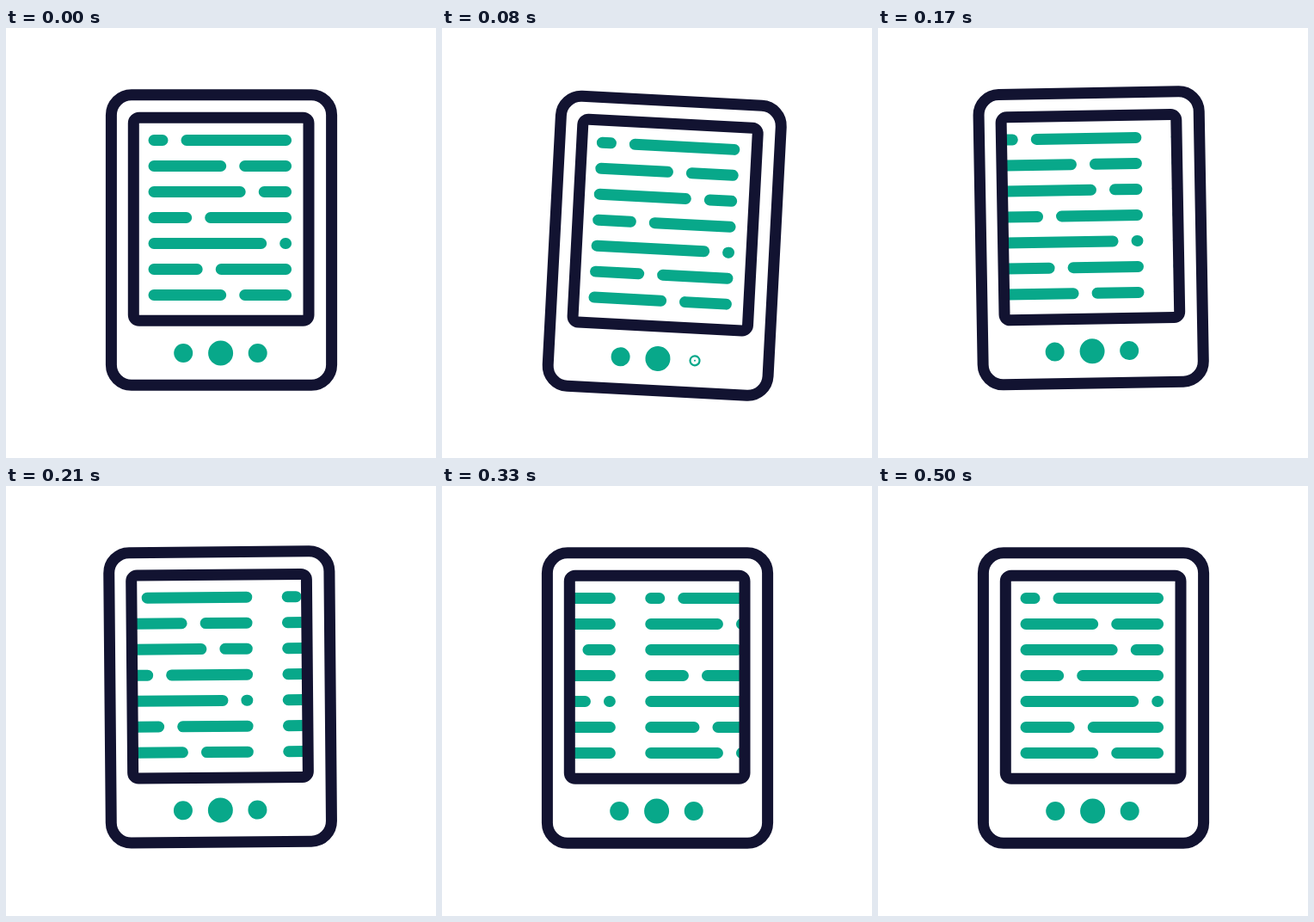
These frames come from a looping animation (500x500 px, 0.54 s). An HTML page:

```html
<!DOCTYPE html>
<html lang="en">
<head>
<meta charset="utf-8">
<title>E-reader page turn</title>
<style>
  html, body { margin: 0; height: 100%; overflow: hidden; background: #fff; }
  svg { display: block; width: 100vw; height: 100vh; }
</style>
</head>
<body>
<svg viewBox="0 0 500 500">
  <clipPath id="screen"><rect x="154" y="110" width="192" height="225"/></clipPath>
  <g id="device" fill="none" stroke-width="13">
    <g clip-path="url(#screen)">
      <path id="text" stroke="#08a88a" stroke-linecap="round"/>
    </g>
    <g stroke="#121331">
      <rect x="122.4" y="77.8" width="256.2" height="337.4" rx="23.5"/>
      <rect x="148.3" y="104.3" width="203.7" height="236" rx="6.5"/>
    </g>
    <g fill="#08a88a">
      <circle cx="206.2" cy="378" r="11"/>
      <circle cx="249.6" cy="378" r="14.5"/>
      <circle cx="292.7" cy="378" r="1"/>
    </g>
    <circle id="button" cx="292.7" cy="378" r="5.5" stroke="#08a88a"/>
  </g>
</svg>
<script>
const LOOP = 540, FPS = 24, PAGE = 201;
const device = document.getElementById("device");
const text = document.getElementById("text");
const button = document.getElementById("button");

const LEFT = 172, RIGHT = 325.6, GAP = 28;
const splits = [182, 249.7, 272.2, 209.7, 296.7, 222.2, 249.7];
const page = dx => splits.map((x, row) =>
  `M${LEFT + dx} ${130.5 + 30 * row}H${x + dx}m${GAP} 0H${RIGHT + dx}`).join("");
text.setAttribute("d", page(0) + page(PAGE));

// Eased interpolation through [step, value] pairs
function track(keys, step) {
  if (step >= keys.at(-1)[0]) return keys.at(-1)[1];
  const i = keys.findIndex(key => key[0] > step);
  const [s0, v0] = keys[i - 1], [s1, v1] = keys[i];
  const u = (step - s0) / (s1 - s0);
  return v0 + (v1 - v0) * u * u * (3 - 2 * u);
}

const tilt = [[0, 0], [2, 3], [4, -1], [6, 0]];
const press = [[0, 11], [2, 2.2], [4, 11]];
const scroll = [[0, 0], [2, 0], [12, -PAGE]];

const stepStart = n => Math.round(n * 100 / FPS) * 10;

function draw(now) {
  const time = now % LOOP;
  let step = 0;
  while (step < 12 && stepStart(step + 1) <= time) step++;
  device.setAttribute("transform", `rotate(${track(tilt, step)} 125 407)`);
  text.setAttribute("transform", `translate(${track(scroll, step)} 0)`);
  button.setAttribute("stroke-width", track(press, step));
}

const start = performance.now();
function tick() {
  draw(performance.now() - start);
  requestAnimationFrame(tick);
}
tick();
</script>
</body>
</html>
```
